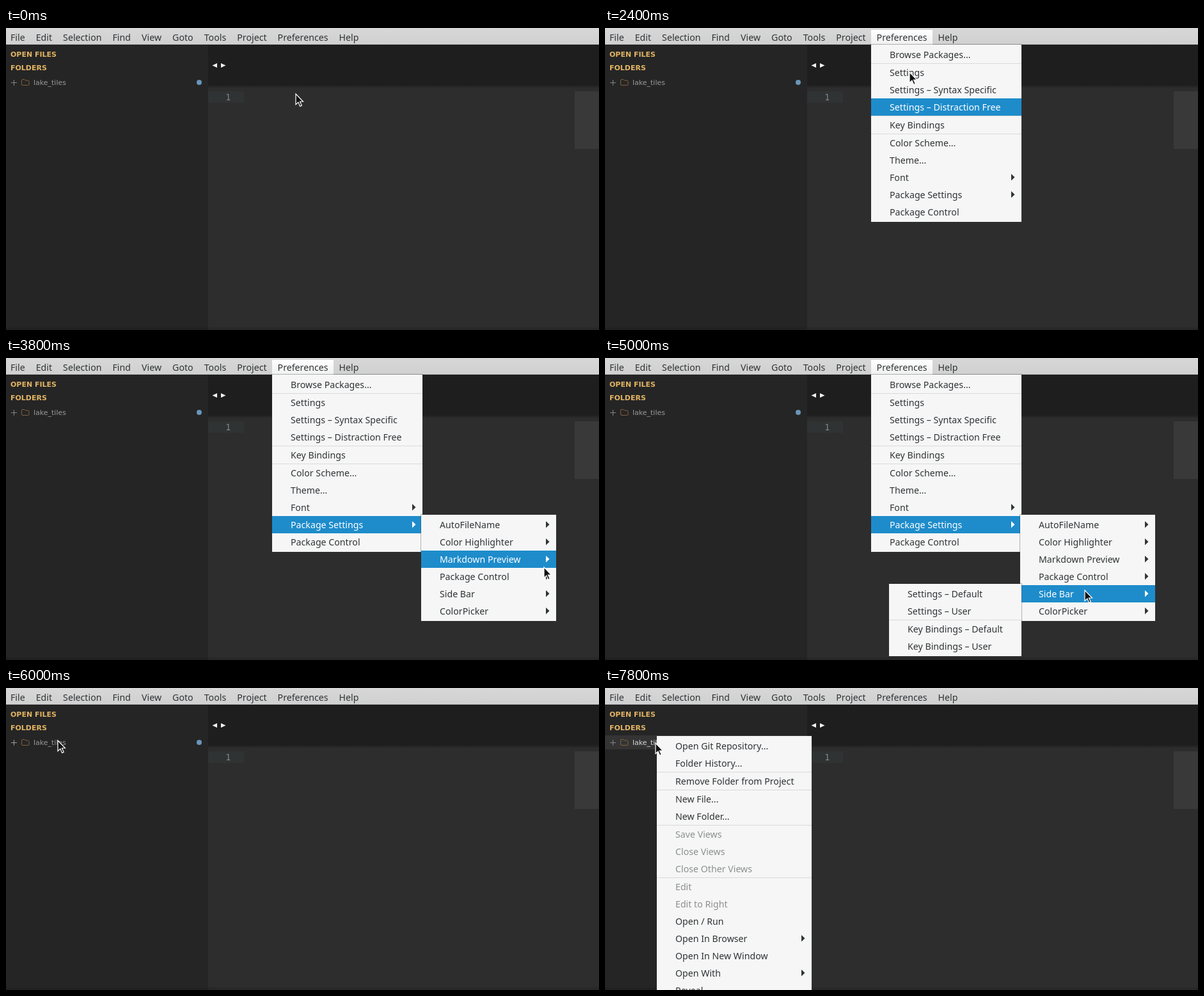
Write an HTML page that moves like this. It is 927 px wide and 472 px high and loops after 8 s.

```html
<!DOCTYPE html>
<html lang="en">
<head>
<meta charset="utf-8">
<title>Editor menus</title>
<style>
html, body { margin: 0; width: 100%; height: 100%; overflow: hidden; background: #2d2d2d; }
svg { display: block; width: 927px; height: 472px; }
text { white-space: pre; }
.ui { font: 14.2px "Noto Sans", "Open Sans", sans-serif; fill: #303436; }
.side { font: 11px "DejaVu Sans", sans-serif; fill: #999; }
.head { font-weight: bold; fill: #e2b464; }
.num { font: 13.3px "DejaVu Sans Mono", monospace; fill: #868686; }
.off { fill: #8c8f90; }
.lit text, .lit path { fill: #fff; }
.hl { fill: #1e8ccb; visibility: hidden; }
.lit .hl { visibility: visible; }
</style>
</head>
<body>
<svg viewBox="0 0 927 472">
  <defs>
    <linearGradient id="bar" x2="0" y2="1"><stop stop-color="#d7d7d7"/><stop offset="1" stop-color="#d0d0d0"/></linearGradient>
    <linearGradient id="tab" x2="0" y2="1"><stop stop-color="#fff"/><stop offset="1" stop-color="#f0f0f0"/></linearGradient>
    <linearGradient id="shade" x2="0" y2="1"><stop stop-color="#1e1e1e"/><stop offset="1" stop-color="#2d2d2d"/></linearGradient>
  </defs>
  <rect width="927" height="472" fill="#2d2d2d"/>
  <rect y="26" width="316" height="446" fill="#252525"/>
  <rect x="316" y="26" width="611" height="64" fill="#1e1e1e"/>
  <rect x="316" y="89" width="611" height="5" fill="url(#shade)"/>
  <rect x="316" y="99" width="56" height="18" fill="#303333"/>
  <rect x="889" y="99" width="38" height="90" fill="#393939"/>
  <rect y="468" width="927" height="4" fill="#000" opacity=".12"/>
  <path d="M322.5 58.5L330 55v7zM343.5 58.5L336 55v7z" fill="#f4f4f4"/>
  <text class="num" x="343.3" y="113">1</text>

  <rect id="row" y="74" width="316" height="22" fill="#343434"/>
  <text class="side head" x="7" y="45">OPEN FILES</text>
  <text class="side head" x="7" y="66">FOLDERS</text>
  <path id="plus" d="M8 85.5h9M12.5 81v9" stroke="#858585"/>
  <path d="M24.5 88V82q0-1.5 1.5-1.5h3l1.5 1.5h4q1.5 0 1.5 1.5V88q0 1.5-1.5 1.5h-8.5q-1.5 0-1.5-1.5z" fill="none" stroke="#80603f"/>
  <text id="folder" class="side" x="43" y="89">lake_tiles</text>
  <circle cx="302" cy="85" r="4" fill="#6a95b9"/>

  <rect width="927" height="26" fill="url(#bar)"/>
  <rect y="25" width="927" height="1" fill="#b9b9b9"/>
  <rect id="active" x="416" y="3" width="96" height="23" fill="url(#tab)"/>
  <text id="titles" class="ui" x="7" y="20"></text>
  <g id="menus" class="ui"></g>
  <path id="cursor" d="M0 0V16.6L3.9 13L6.7 19.4L9.3 18.3L6.5 12H11.5Z" fill="#111" stroke="#fff" stroke-width="1.2"/>
</svg>
<script>
const NS = "http://www.w3.org/2000/svg";
const $ = id => document.getElementById(id);
const ROW = 27, LOOP = 8000, TICK = 100;

function add(parent, tag, attrs, text) {
  const el = document.createElementNS(NS, tag);
  for (const k in attrs) el.setAttribute(k, attrs[k]);
  if (text) el.textContent = text;
  parent.appendChild(el);
  return el;
}

"File Edit Selection Find View Goto Tools Project Preferences Help".split(" ")
  .forEach((name, i) => add($("titles"), "tspan", { dx: i ? 17 : 0 }, name));

// Label marks: "-" separator, trailing ">" submenu, leading "~" disabled
function menu(x, y, w, labels) {
  const g = add($("menus"), "g", {});
  const lines = labels.filter(l => l === "-").length;
  const h = (labels.length - lines) * ROW + lines + 4;
  add(g, "rect", { x: x - 1, y: y - 1, width: w + 2, height: h + 2, opacity: .35 });
  add(g, "rect", { x, y, width: w, height: h, fill: "#f6f6f6" });
  const rows = [];
  let top = y + 2;
  for (const label of labels) {
    if (label === "-") {
      add(g, "rect", { x, y: top++, width: w, height: 1, fill: "#dadada" });
      continue;
    }
    const row = add(g, "g", {});
    add(row, "rect", { class: "hl", x, y: top, width: w, height: ROW });
    add(row, "text", { x: x + 29, y: top + 19, class: label[0] === "~" ? "off" : "on" }, label.replace(/[~>]/g, ""));
    if (label.endsWith(">")) add(row, "path", { d: `M${x + w - 16} ${top + 8}l5.5 5.2l-5.5 5.2z` });
    rows.push(row);
    top += ROW;
  }
  return (open, lit) => {
    g.style.display = open ? "" : "none";
    rows.forEach((r, i) => r.setAttribute("class", i === lit ? "lit" : ""));
  };
}

const prefs = menu(416, 26, 235, ["Browse Packages...", "-", "Settings", "Settings – Syntax Specific",
  "Settings – Distraction Free", "-", "Key Bindings", "-", "Color Scheme...", "Theme...", "Font>",
  "Package Settings>", "Package Control"]);
const packs = menu(649, 245, 211, ["AutoFileName>", "Color Highlighter>", "Markdown Preview>",
  "Package Control>", "Side Bar>", "ColorPicker>"]);
const sideBar = menu(444, 353, 207, ["Settings – Default", "Settings – User", "-",
  "Key Bindings – Default", "Key Bindings – User"]);
const context = menu(81, 75, 242, ["Open Git Repository...", "Folder History...", "-",
  "Remove Folder from Project", "-", "New File...", "New Folder...", "-", "~Save Views", "~Close Views",
  "~Close Other Views", "-", "~Edit", "~Edit to Right", "Open / Run", "Open In Browser>",
  "Open In New Window", "Open With>", "Reveal"]);

const easeOut = u => Math.sin(u * Math.PI / 2);
const easeBoth = u => u * u * u * (u * (6 * u - 15) + 10);

// Cursor glides: a curve from the last resting place to `to`, pulled towards `bend`
const glides = [
  { from: 0, until: 100, to: [450, 97] },
  { from: 400, until: 1100, to: [470, 25], bend: [448, 104], ease: easeBoth },
  { from: 1300, until: 1400, to: [470, 18] },
  { from: 2300, until: 3000, to: [544, 259], bend: [477, 131] },
  { from: 3400, until: 4100, to: [765, 369], bend: [1020, 262] },
  { from: 4900, until: 5600, to: [101, 107], ease: easeBoth },
  { from: 5600, until: 5800, to: [99, 103] },
  { from: 5800, until: 6000, to: [81, 82] },
  { from: 7600, until: 7800, to: [79, 86] }
];

function cursorAt(t) {
  let pos = [453, 103];
  for (const { from, until, to, bend, ease = easeOut } of glides) {
    if (t <= from) break;
    const u = ease(Math.min(1, (t - from) / (until - from))), v = 1 - u;
    pos = pos.map((p, i) => {
      const mid = bend ? bend[i] : (p + to[i]) / 2;
      return v * v * p + 2 * u * v * mid + u * u * to[i];
    });
  }
  return pos.map(Math.round);
}

function draw(time) {
  const t = Math.floor(time / TICK) * TICK;
  const within = (a, b) => t >= a && t < b;
  const prefsOpen = within(1300, 5700), picked = t >= 6400;

  // Highlights run down the rows until they reach the entry that opens the next menu
  prefs(prefsOpen, within(2400, 5300) ? Math.min(8, 3 + (t - 2400) / 50) : -1);
  packs(within(2800, 5300), within(3700, 5200) ? Math.min(4, (t - 3600) / TICK) : -1);
  sideBar(within(4100, 5200), -1);
  context(picked, t < 7700 ? 0 : -1);

  $("cursor").setAttribute("transform", `translate(${cursorAt(t)})`);
  $("active").style.display = prefsOpen ? "" : "none";
  $("row").style.display = picked ? "" : "none";
  $("folder").style.fill = picked ? "#d8d8d8" : "";
  $("plus").style.stroke = within(5800, 6400) ? "#9c9c9c" : "";
}

function tick() {
  draw(performance.now() % LOOP);
  requestAnimationFrame(tick);
}
tick();
</script>
</body>
</html>
```
